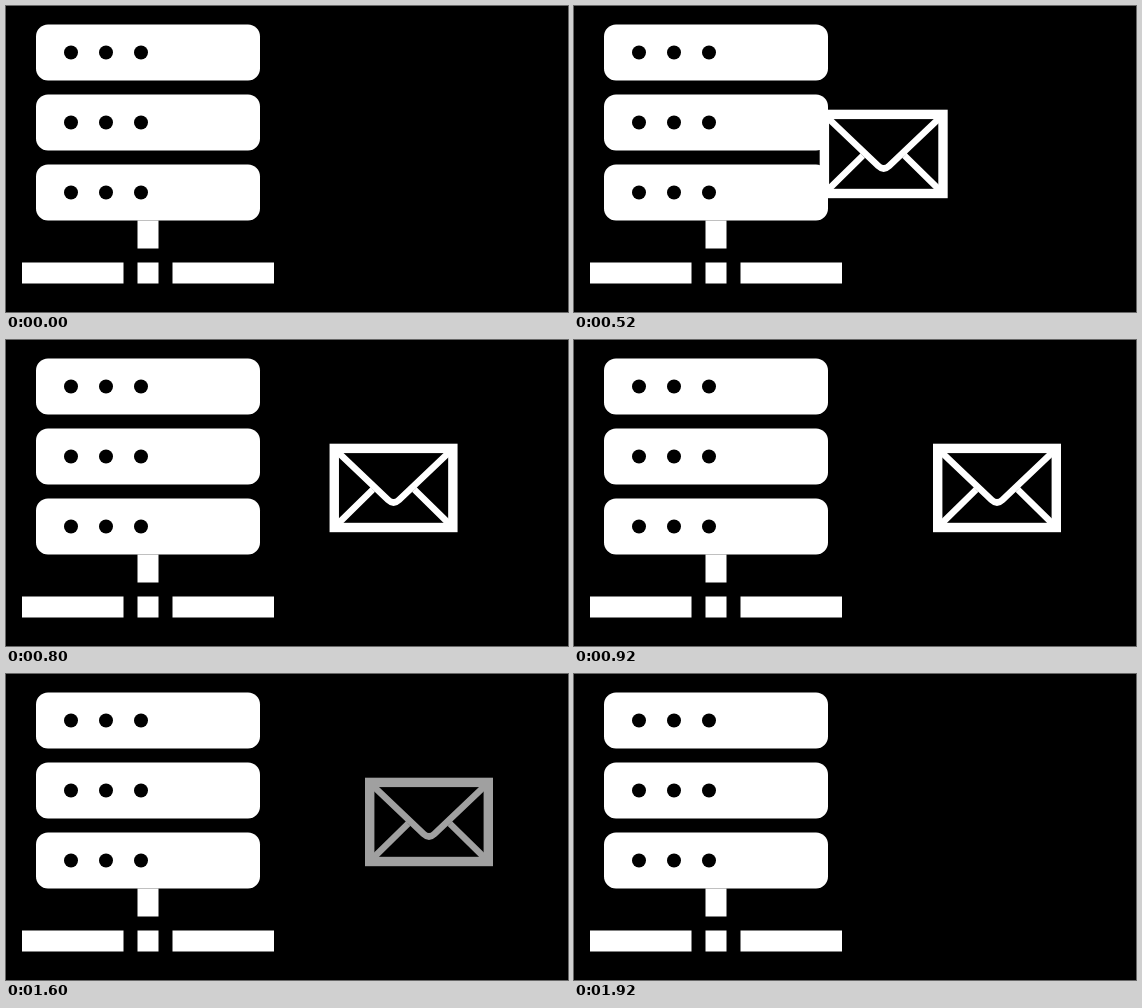
Write an HTML page that moves like this. It is 562x306 px and loops after 3.2 s.

```html
<!DOCTYPE html>
<html lang="en">
<head>
<meta charset="utf-8">
<title>Mail leaving a server</title>
<style>
html, body { margin: 0; width: 100%; height: 100%; overflow: hidden; background: #000; }
svg { display: block; width: 562px; height: 306px; }
</style>
</head>
<body>
<svg viewBox="0 0 562 306">
  <defs>
    <clipPath id="exit"><rect x="242" y="0" width="320" height="306"/></clipPath>
    <g id="unit">
      <rect x="30" width="224" height="56" rx="12" fill="#fff"/>
      <circle cx="65" cy="28" r="7"/>
      <circle cx="100" cy="28" r="7"/>
      <circle cx="135" cy="28" r="7"/>
    </g>
  </defs>
  <rect width="562" height="306"/>
  <g clip-path="url(#exit)">
    <g id="mail" fill="none" stroke="#fff">
      <rect x="4.7" y="4.7" width="118.6" height="79.1" stroke-width="9.4"/>
      <path d="M7 7.1L58.5 56.2Q64 61.4 69.5 56.2L121 7.1M7 81.4L43 46M121 81.4L85 46" stroke-width="6.5"/>
    </g>
  </g>
  <use href="#unit" y="18.5"/>
  <use href="#unit" y="88.5"/>
  <use href="#unit" y="158.5"/>
  <path fill="#fff" d="M131.5 214.5h21v28h-21zM16 256.5h101.5v21H16zM131.5 256.5h21v21h-21zM166.5 256.5H268v21H166.5z"/>
</svg>
<script>
const LOOP = 3200, STEP = 40;
const mail = document.getElementById('mail');
// [time, left edge]
const path = [[0, 94.2], [600, 269], [640, 276.3], [920, 359]];

function leftAt(t) {
  for (let i = 1; i < path.length; i++) {
    const [t0, x0] = path[i - 1], [t1, x1] = path[i];
    if (t <= t1) return x0 + (x1 - x0) * (t - t0) / (t1 - t0);
  }
  return path[path.length - 1][1];
}

function fadeAt(t) {
  return t < 1480 ? 1 : Math.max(0, (1908 - t) / 492);
}

function draw(ms) {
  const t = Math.floor((ms % LOOP) / STEP) * STEP;
  mail.setAttribute('transform', `translate(${leftAt(t).toFixed(2)} 103.7)`);
  mail.setAttribute('opacity', fadeAt(t).toFixed(3));
}

const start = performance.now();
function tick() {
  draw(performance.now() - start);
  requestAnimationFrame(tick);
}
tick();
</script>
</body>
</html>
```
